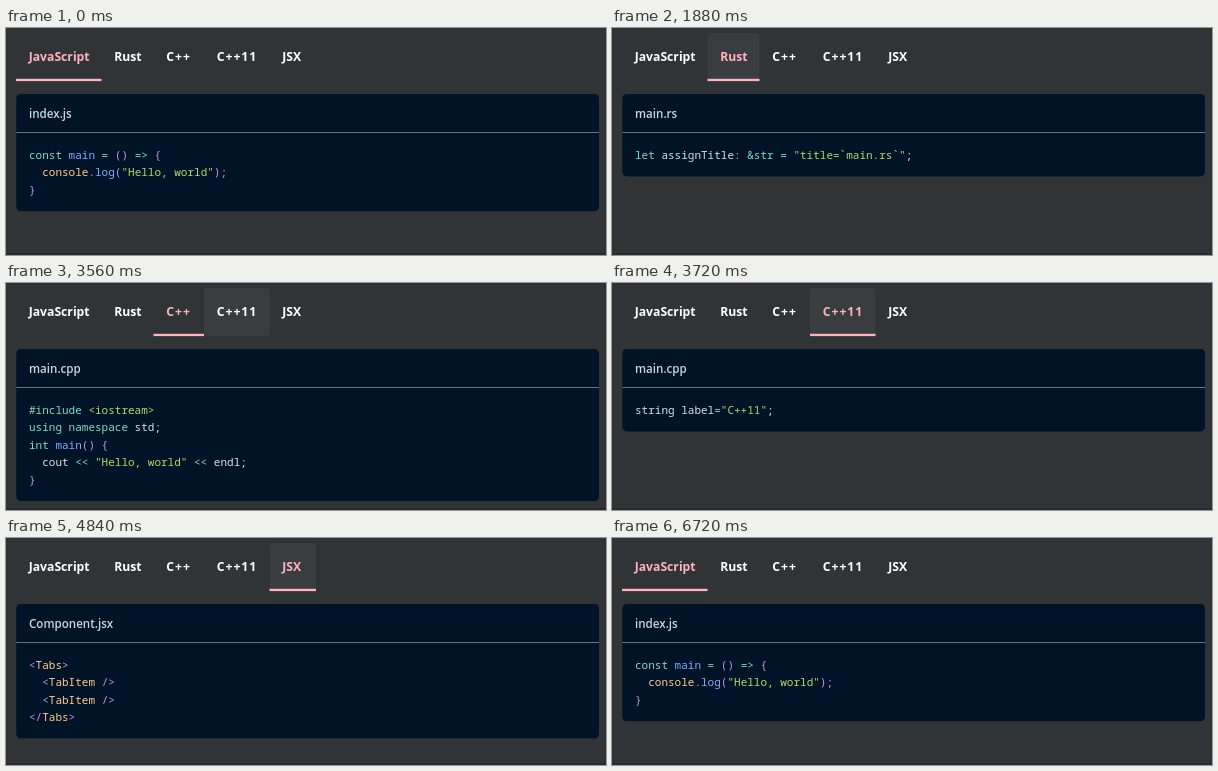
An HTML page for the animation above (6760 ms loop, 600 by 227 pixels).

```html
<!DOCTYPE html>
<html lang="en">
<head>
<meta charset="utf-8">
<title>Code tabs</title>
<style>
  html, body { margin: 0; width: 100%; height: 100%; overflow: hidden; background: #313437; }
  svg { display: block; width: 600px; height: 227px; }
  text { white-space: pre; }
  .label { font: 700 12.2px "Open Sans", "Noto Sans", sans-serif; }
  .wide { letter-spacing: 1px; }
  .title { font: 600 11.6px "Open Sans", "Noto Sans", sans-serif; fill: #ccd4df; }
  .code { font: 500 11px "Noto Sans Mono", "DejaVu Sans Mono", monospace; }
</style>
</head>
<body>
<svg id="stage" viewBox="0 0 600 227"></svg>
<script>
const LOOP = 6760, FADE = 200, LINE = 17.4;
const PINK = '#ffb3bf';

// Token colours, keyed by the first letter of each token.
const INK = {
  k: '#7fdbca', f: '#82aaff', p: '#c792ea', s: '#addb67', c: '#ffcb8b', t: '#d6deeb'
};

const tabs = [
  { name: 'JavaScript', x: 10, w: 85.5, file: 'index.js', code: [
    'kconst |fmain |k= |p() |k=> |p{',
    't  |cconsole|p.|flog|p(|s"Hello, world"|p)|p;',
    'p}'] },
  { name: 'Rust', x: 95.5, w: 52, file: 'main.rs', code: [
    'klet |tassignTitle|p: |k&str |k= |s"title=`main.rs`"|t;'] },
  { name: 'C++', x: 147.5, w: 50.5, file: 'main.cpp', code: [
    'k#include |s<iostream>',
    'kusing namespace |tstd;',
    'kint |fmain|p() {',
    't  cout |k<< |s"Hello, world" |k<< |tendl;',
    'p}'] },
  { name: 'C++11', x: 198, w: 65.5, file: 'main.cpp', code: [
    'tstring label|k=|s"C++11"|t;'] },
  { name: 'JSX', x: 263.5, w: 46.5, file: 'Component.jsx', code: [
    'p<|cTabs|p>',
    'p  <|cTabItem |p/>',
    'p  <|cTabItem |p/>',
    'p</|cTabs|p>'] }
];

const clicks = [[0, 0], [1440, 1], [2840, 2], [3640, 3], [4560, 4], [5520, 0]];
// [tab, pointer enters, pointer leaves]
const hovers = [[1, 760, 2160], [2, 2160, 3160], [3, 3160, 4120], [4, 4120, 5040], [0, 5140, 5760]];

const stage = document.getElementById('stage');

function add(parent, tag, attrs, text) {
  const el = document.createElementNS('http://www.w3.org/2000/svg', tag);
  for (const key in attrs) el.setAttribute(key, attrs[key]);
  if (text) el.textContent = text;
  parent.append(el);
  return el;
}

function addCode(parent, line, y) {
  const row = add(parent, 'text', { class: 'code', x: 23, y });
  for (const token of line.split('|')) {
    add(row, 'tspan', { fill: INK[token[0]] }, token.slice(1));
  }
}

function buildTab(tab) {
  const { x, w, name } = tab;
  tab.hover = add(stage, 'rect', { x, y: 5, width: w, height: 48, rx: 4, fill: '#fff' });
  tab.bar = add(stage, 'rect', { x, y: 50.8, width: w, height: 2.3, fill: PINK });
  tab.label = add(stage, 'text', {
    class: name.includes('+') ? 'label wide' : 'label', x: x + 12.7, y: 33
  }, name);

  const panel = tab.panel = add(stage, 'g', {});
  add(panel, 'rect', {
    x: 10.3, y: 66, width: 582.7, height: 65 + LINE * tab.code.length, rx: 4.5, fill: '#011427'
  });
  add(panel, 'rect', { x: 10.3, y: 104, width: 582.7, height: 1, fill: '#687481' });
  add(panel, 'text', { class: 'title', x: 23, y: 89.6 }, tab.file);
  tab.code.forEach((line, i) => addCode(panel, line, 131 + i * LINE));
}

const clamp = v => Math.min(1, Math.max(0, v));
const smooth = v => v * v * (3 - 2 * v);
const ramp = (t, start) => smooth(clamp((t - start) / FADE));

function draw(t) {
  const active = clicks.filter(([at]) => at <= t).pop()[1];
  tabs.forEach((tab, i) => {
    const on = i === active;
    tab.label.setAttribute('fill', on ? PINK : '#fff');
    tab.bar.setAttribute('visibility', on ? 'visible' : 'hidden');
    tab.panel.setAttribute('visibility', on ? 'visible' : 'hidden');
  });
  for (const [i, enter, leave] of hovers) {
    tabs[i].hover.setAttribute('opacity', 0.045 * (ramp(t, enter) - ramp(t, leave)));
  }
}

add(stage, 'rect', { width: 600, height: 227, fill: '#313437' });
add(stage, 'rect', { y: 225, width: 600, height: 2, fill: '#292b2e' });
tabs.forEach(buildTab);

const begin = performance.now();
function tick() {
  draw((performance.now() - begin) % LOOP);
  requestAnimationFrame(tick);
}
tick();
</script>
</body>
</html>
```
